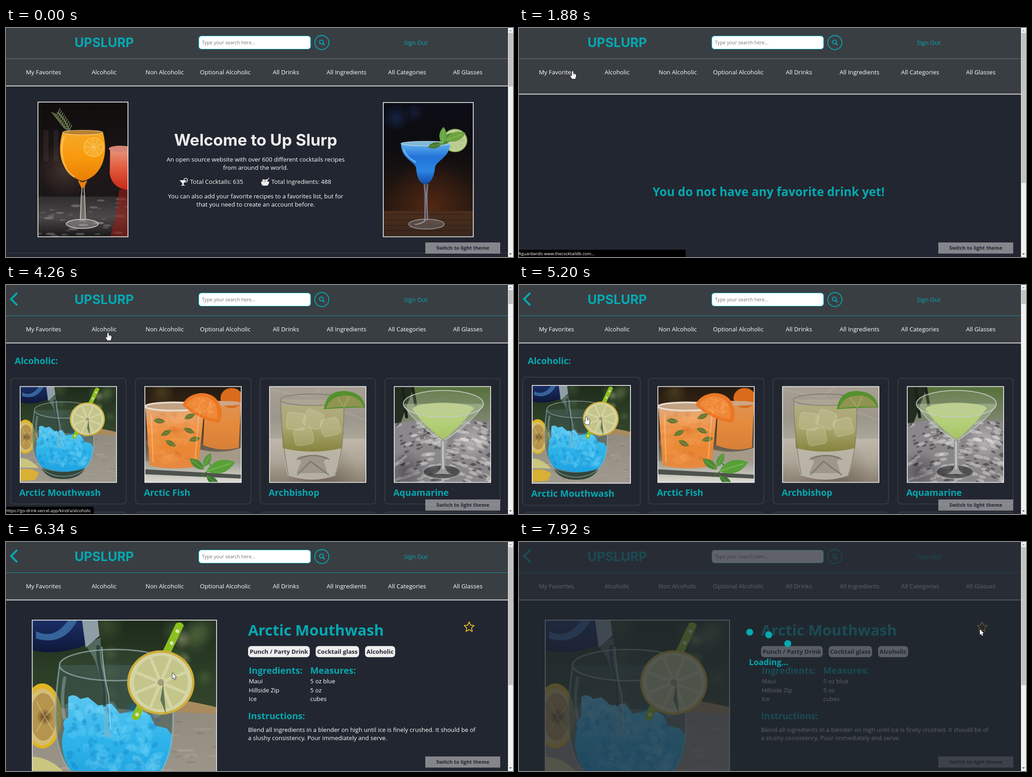
Animation, 1110 px wide and 504 px high, one loop 7.99 s. Source, as an HTML page with a canvas:

```html
<!DOCTYPE html>
<html lang="en">
<head>
<meta charset="utf-8">
<title>Cocktail site tour</title>
<style>
html, body { margin: 0; width: 100%; height: 100%; overflow: hidden; background: #222630; }
canvas { display: block; width: 1110px; height: 504px; }
</style>
</head>
<body>
<canvas id="stage" width="1110" height="504"></canvas>
<script>
const ctx = document.getElementById('stage').getContext('2d');
const LOOP = 7990, VIEW = 1099;
const BG = '#222630', BAR = '#393e43', TEAL = '#06a9b1', LIGHT = '#eeeeee', WHITE = '#ffffff';
const SANS = '"Open Sans", "Noto Sans", sans-serif';
const LOGO = 'Inter, sans-serif';

// ---- drawing helpers ----
function text(str, x, y, size = 13.1, color = WHITE, weight = 400, align = 'left', family = SANS) {
  ctx.font = `${weight} ${size}px ${family}`;
  ctx.textAlign = align;
  ctx.fillStyle = color;
  ctx.fillText(str, x, y);
}
const bold = (str, x, y, size, color = TEAL, align) => text(str, x, y, size, color, 700, align);

function rect(x, y, w, h, color) {
  ctx.fillStyle = color;
  ctx.fillRect(x, y, w, h);
}
function round(x, y, w, h, r, fill, stroke, width = 1) {
  ctx.beginPath();
  ctx.roundRect(x, y, w, h, r);
  if (fill) { ctx.fillStyle = fill; ctx.fill(); }
  if (stroke) { ctx.strokeStyle = stroke; ctx.lineWidth = width; ctx.stroke(); }
}
function oval(x, y, rx, ry, fill, stroke, width = 2, turn = 0) {
  ctx.beginPath();
  ctx.ellipse(x, y, rx, ry, turn, 0, Math.PI * 2);
  if (fill) { ctx.fillStyle = fill; ctx.fill(); }
  if (stroke) { ctx.strokeStyle = stroke; ctx.lineWidth = width; ctx.stroke(); }
}
function fill(d, color) {
  ctx.fillStyle = color;
  ctx.fill(new Path2D(d));
}
function line(d, color, width) {
  ctx.strokeStyle = color;
  ctx.lineWidth = width;
  ctx.stroke(new Path2D(d));
}
function fade(y0, y1, ...colors) {
  const g = ctx.createLinearGradient(0, y0, 0, y1);
  colors.forEach((c, i) => g.addColorStop(i / (colors.length - 1), c));
  return g;
}
function glow(x, y, r, rgb, alpha) {
  const g = ctx.createRadialGradient(x, y, 0, x, y, r);
  g.addColorStop(0, `rgba(${rgb},${alpha})`);
  g.addColorStop(1, `rgba(${rgb},0)`);
  rect(x - r, y - r, 2 * r, 2 * r, g);
}
function scatter(n, seed, draw) {
  const rnd = () => (seed = (seed * 16807) % 2147483647) / 2147483647;
  rnd();
  for (let i = 0; i < n; i++) draw(rnd(), rnd(), rnd());
}
function photo(x, y, w, h, unit, draw) {
  ctx.save();
  ctx.beginPath();
  ctx.rect(x, y, w, h);
  ctx.clip();
  ctx.translate(x, y);
  ctx.scale(w / unit, w / unit);
  draw();
  ctx.restore();
  ctx.strokeStyle = LIGHT;
  ctx.lineWidth = 1.7;
  ctx.strokeRect(x, y, w, h);
}
function slice(x, y, r, rim, pith, flesh, core, pieces = 9) {
  oval(x, y, r, r * .96, rim);
  oval(x, y, r * .93, r * .89, pith);
  for (let i = 0; i < pieces; i++) {
    const a = i / pieces * Math.PI * 2, half = Math.PI / pieces * .86;
    ctx.beginPath();
    ctx.moveTo(x + Math.cos(a) * r * .13, y + Math.sin(a) * r * .13);
    ctx.arc(x, y, r * .8, a - half, a + half);
    ctx.closePath();
    ctx.fillStyle = flesh;
    ctx.fill();
  }
  oval(x, y, r * .1, r * .1, core);
}
function leaf(x, y, len, turn, color) {
  ctx.save();
  ctx.translate(x, y);
  ctx.rotate(turn);
  fill(`M0 0 Q${len * .5} ${-len * .42} ${len} 0 Q${len * .5} ${len * .42} 0 0Z`, color);
  line(`M0 0 L${len * .85} 0`, 'rgba(190,220,140,.3)', len * .04);
  ctx.restore();
}

// ---- pictures ----
function orangeDrink() {
  rect(0, 0, 197, 298, fade(0, 298, '#100c0c', '#1e1819', '#171314'));
  for (let x = 12; x < 130; x += 22) rect(x, 62, 11, 68, 'rgba(105,85,85,.2)');
  glow(60, 150, 60, '150,110,90', .3);
  rect(0, 208, 197, 90, fade(208, 298, '#302d2e', '#4b4849', '#171617'));
  scatter(45, 7, (a, b, c) => oval(a * 197, 212 + b * 85, 2 + c * 10, 1 + c * 2, `rgba(205,200,198,${.08 + c * .25})`));
  fill('M158 104 L197 104 L197 194 Q163 190 157 158Z', fade(100, 194, '#e79b83', '#e2593c', '#c52716'));
  oval(180, 103, 25, 7, '#d58572');
  fill('M178 192 L197 194 L197 298 L158 298 L170 250Z', 'rgba(150,30,22,.6)');
  for (let i = 0; i < 9; i++) {
    const x = 68 - i * 3.2, y = 64 - i * 4.5;
    line(`M${x} ${y} l-13 ${-9 + i * .5} M${x} ${y} l6 -14`, '#63734d', 2);
  }
  line('M70 67 Q62 40 42 22', '#6e7c51', 2.5);
  fill('M54 66 C39 113 53 161 97 174 C143 163 155 112 142 66Z', fade(66, 175, '#f5a928', '#f89a0d', '#e87d06'));
  oval(98, 67, 44, 5, '#ba812f', '#f0cf8a', 1.2);
  line('M57 75 C43 122 62 155 80 165', 'rgba(255,231,160,.4)', 4);
  slice(122, 99, 25, '#f69800', '#f7bb4c', '#f8ab27', '#f5c66b');
  line('M90 173 Q99 184 95 205 L93 259 M105 173 Q99 184 102 205 L104 259', '#b8b0ab', 2);
  fill('M87 172 Q97 180 108 172 L101 189 L95 189Z', '#e4820c');
  fill('M94 205 L102 205 L104 263 L91 263Z', 'rgba(210,205,200,.32)');
  oval(97, 268, 35, 10, 'rgba(185,182,180,.4)', '#c0bbb7', 2);
}

function blueDrink() {
  rect(0, 0, 198, 297, fade(0, 297, '#0c0d16', '#0d0c10', '#211610', '#2d1c13'));
  glow(28, 34, 30, '30,54,105', .55);
  glow(68, 22, 22, '33,48,92', .45);
  glow(105, 230, 105, '105,47,20', .65);
  rect(0, 240, 198, 57, fade(240, 297, '#4b2e1d', '#39271d'));
  for (let y = 247; y < 297; y += 12) rect(0, y, 198, 1, 'rgba(17,10,8,.5)');
  slice(158, 84, 27, '#83a653', '#c6d39a', '#b7c98c', '#dbe3b4');
  fill('M39 91 C40 125 65 128 72 143 C74 171 83 180 93 181 C105 178 112 165 114 142 C120 127 146 121 147 91Z',
    fade(90, 181, '#61b2ed', '#2374d9', '#2b86e4', '#1349a9'));
  oval(93, 91, 54, 5, '#81b7d6', '#b0d4e7', 1.4);
  line('M45 104 Q51 121 72 132', 'rgba(185,225,255,.5)', 3);
  leaf(127, 94, 38, -.8, '#4d8434');
  leaf(130, 92, 38, -1.5, '#66a642');
  leaf(129, 91, 32, 2.9, '#47792f');
  leaf(136, 84, 48, -.35, '#6da340');
  line('M90 181 L93 205 L91 260 M98 181 L95 205 L98 260', '#8c92a2', 1.8);
  fill('M89 180 L99 180 L97 262 L91 262Z', 'rgba(132,146,182,.35)');
  oval(95, 269, 39, 11, 'rgba(130,126,133,.4)', '#8e8b8e', 2);
  line('M92 259 Q92 266 70 270', 'rgba(220,220,230,.6)', 2);
}

function mouthwash() {
  rect(0, 0, 400, 400, fade(0, 210, '#1d2a1b', '#2b3d26', '#34462c'));
  scatter(14, 31, (a, b, c) => glow(150 + a * 250, b * 170, 15 + c * 28, '100,125,75', .35));
  glow(325, 42, 22, '150,155,115', .6);
  glow(330, 84, 16, '140,150,105', .5);
  fill('M285 168 Q352 178 400 190 L400 215 L240 230Z', '#a88a5e');
  fill('M0 196 L120 190 L400 205 L400 400 L0 400Z', fade(200, 400, '#918b80', '#a09a8e'));
  scatter(70, 11, (a, b, c) => oval(a * 400, 220 + b * 180, 6 + c * 16, 2,
    c > .5 ? 'rgba(190,184,172,.25)' : 'rgba(80,74,66,.18)'));
  fill('M0 0 L130 0 L112 56 Q55 78 0 66Z', fade(0, 72, '#1a2e66', '#0e1738'));
  fill('M8 24 Q48 44 78 0 L98 0 Q68 58 8 40Z', '#35639a');
  fill('M108 0 L142 0 L146 34 L116 60Z', '#8f9ea6');
  oval(22, 209, 42, 71, '#e0b422');
  oval(22, 211, 35, 62, '#d3bd72');
  oval(24, 211, 28, 52, '#b5954d');
  glow(27, 211, 18, '80,52,30', .9);
  line('M27 211 L9 177 M27 211 L47 187 M27 211 L9 243 M27 211 L46 242', 'rgba(222,204,145,.5)', 2.5);
  fill('M0 298 Q43 300 77 340 L0 337Z', '#c9c680');
  fill('M0 348 Q42 335 78 360 L62 390 L0 394Z', '#d8b033');
  fill('M58 98 C48 180 39 272 81 327 C115 392 244 391 279 328 C319 269 302 165 298 98Z', 'rgba(62,88,84,.55)');
  fill('M78 168 Q90 158 104 172 L121 168 L143 186 L172 182 L190 204 L230 196 L256 207 L266 230 L292 236 L304 252 C304 288 290 327 263 346 Q176 368 94 338 C67 315 58 270 70 236 Q62 220 78 212Z',
    fade(160, 355, '#5cc8f0', '#2fb4ea', '#1fa2df'));
  scatter(130, 19, (a, b, c) => oval(80 + a * 195, 186 + b * 140, 4 + c * 11, 3 + c * 6,
    c > .45 ? 'rgba(130,218,250,.22)' : 'rgba(8,110,185,.24)', null, 1, a * 9));
  fill('M88 340 Q176 373 271 340 Q248 386 177 386 Q110 386 88 340Z', '#34463a');
  fill('M117 52 L148 38 C150 98 163 130 165 237 L177 256 L155 253 C157 151 147 95 120 62Z', 'rgba(150,180,186,.4)');
  line('M143 55 C139 99 157 118 157 188', 'rgba(28,45,42,.7)', 7);
  line('M151 58 Q155 119 166 165 L170 240', 'rgba(200,220,224,.6)', 2.5);
  oval(180, 98, 121, 34, 'rgba(148,176,166,.06)', 'rgba(150,172,172,.75)', 3);
  line('M59 102 C48 179 40 276 82 328 C117 391 242 390 279 329 C318 273 304 173 299 102', 'rgba(160,188,190,.55)', 3.5);
  line('M71 123 Q61 172 70 216', 'rgba(210,230,232,.3)', 7);
  fill('M312 7 Q324 1 329 12 L231 216 Q220 222 215 211Z', '#8cc01f');
  for (let i = 0; i < 8; i++) oval(315 - i * 12.5, 24 + i * 26, 4, 4, '#d9e6b4');
  slice(279, 136, 73, '#cfae3a', '#d4d4a4', '#c3c58b', '#a39c78', 8);
  fill('M284 138 L290 204 L278 174Z', '#607656');
}

function fishDrink() {
  rect(0, 0, 400, 400, fade(0, 400, '#241a10', '#3d2a18', '#6d6353', '#c3bfb3'));
  glow(70, 25, 55, '100,86,43', .5);
  fill('M250 55 L400 68 L390 254 Q320 275 242 245Z', fade(60, 255, '#dd9558', '#e58a3c', '#d98038'));
  oval(360, 48, 46, 42, '#d96c1c');
  oval(325, 70, 80, 10, '#cfa684');
  fill('M225 262 Q320 285 400 255 L400 320 L225 330Z', '#a59a88');
  rect(0, 312, 400, 88, fade(309, 400, '#9a9a90', '#dcdbd2'));
  fill('M0 345 L400 368 L400 384 L0 366Z', '#4d534c');
  fill('M2 82 L248 83 L222 332 Q115 352 20 330Z', fade(80, 345, '#e0ab80', '#ee9449', '#ea8733', '#e58a42'));
  scatter(30, 23, (a, b, c) => oval(30 + a * 180, 110 + b * 200, 10 + c * 22, 8 + c * 12,
    c > .5 ? 'rgba(250,180,110,.16)' : 'rgba(196,88,20,.14)'));
  oval(120, 83, 119, 17, '#c3a184', '#e6dccb', 7);
  fill('M157 78 C171 24 272 3 307 66 Q330 111 309 151 Q227 142 157 78Z', '#ea7724');
  fill('M171 76 C192 35 267 25 293 75 Q307 113 298 136 Q226 125 171 76Z', '#ef8838');
  scatter(40, 14, (a, b, c) => oval(203 + a * 85, 50 + b * 66, 4 + c * 7, 3, 'rgba(255,187,112,.25)', null, 1, a * 3));
  [[35, 141, .1], [163, 134, -.4], [160, 174, .4], [85, 225, .5], [181, 225, -.2], [111, 183, 2.7]]
    .forEach(([x, y, a]) => leaf(x, y, 50, a, '#6b7530'));
  line('M27 115 L34 316 M224 119 L208 312', 'rgba(255,225,181,.35)', 5);
  line('M228 377 L280 338 L253 300', '#417329', 4);
  leaf(247, 346, 76, -2.5, '#4d8a32');
  leaf(254, 353, 126, -.3, '#58a038');
  leaf(244, 336, 66, -1.1, '#57983a');
  leaf(255, 371, 70, .7, '#3e7830');
}

function archbishop() {
  rect(0, 0, 400, 400, fade(0, 400, '#a79f93', '#9d968b', '#b5afa3', '#8c8276'));
  line('M0 12 L165 45 L213 5 M240 80 L400 141', 'rgba(190,185,175,.3)', 5);
  rect(0, 218, 400, 182, fade(218, 400, '#bfb7a9', '#aea698', '#8a7f71'));
  glow(215, 365, 150, '65,56,42', .4);
  fill('M44 54 L310 54 C307 166 315 272 275 371 Q180 408 74 368 C47 278 53 154 44 54Z', 'rgba(180,176,156,.6)');
  fill('M48 80 L307 80 L300 257 Q174 287 55 257Z', fade(80, 275, '#b1ac80', '#a8a46c', '#85823c'));
  [[75, 105, .12], [160, 89, .4], [206, 144, -.25], [96, 181, -.2]].forEach(([x, y, a]) => {
    ctx.save();
    ctx.translate(x, y);
    ctx.rotate(a);
    round(0, 0, 78, 71, 16, 'rgba(214,213,182,.26)', 'rgba(228,228,204,.2)', 4);
    ctx.restore();
  });
  fill('M56 258 Q177 285 300 258 L274 370 Q174 406 74 370Z', 'rgba(190,185,172,.75)');
  fill('M113 296 Q175 276 244 296 L225 312 L240 361 L111 361 L132 312Z', '#9d978a');
  line('M113 305 Q183 270 248 305 M115 369 L170 312 L247 370', 'rgba(100,97,85,.6)', 5);
  oval(177, 55, 132, 24, 'rgba(160,155,135,.2)', 'rgba(110,108,92,.7)', 3);
  line('M46 60 Q50 230 78 367 M308 60 Q312 258 273 369', 'rgba(120,116,100,.7)', 3.5);
  fill('M225 95 Q236 13 317 19 Q389 25 397 87 Q306 88 225 95Z', '#55902f');
  fill('M234 91 Q254 35 324 37 Q370 42 391 84 Q302 81 234 91Z', '#8f9450');
  line('M309 87 L282 47 M309 87 L331 41', 'rgba(200,202,145,.5)', 3);
}

function aquamarine() {
  rect(0, 0, 400, 400, fade(0, 400, '#55703a', '#7b846c', '#8f8e90', '#6c6a6e'));
  fill('M0 0 L81 0 L26 154 L0 154Z', '#232c20');
  line('M34 0 L52 132 M76 0 L93 102', '#1b221a', 12);
  fill('M0 154 Q196 117 400 148 L400 400 L0 400Z', '#89878a');
  scatter(190, 52, (a, b, c) => oval(a * 400, 150 + b * 250, 5 + c * 16, 3 + c * 5,
    c > .5 ? 'rgba(228,225,222,.42)' : 'rgba(30,29,33,.42)', null, 1, -.5 + a));
  glow(320, 230, 80, '225,222,220', .5);
  glow(50, 355, 90, '35,33,38', .5);
  fill('M38 72 L370 72 Q325 143 204 228 Q84 146 38 72Z', 'rgba(170,186,150,.55)');
  fill('M74 92 Q196 61 329 89 Q287 155 204 221 Q118 158 74 92Z', fade(82, 221, '#b9cc8a', '#b4d078', '#a6c262'));
  oval(204, 72, 166, 56, 'rgba(200,212,185,.15)', 'rgba(200,206,200,.85)', 4);
  oval(204, 92, 126, 24, '#bccf90');
  line('M42 81 Q87 153 195 223 M366 82 Q321 150 211 223', 'rgba(208,214,204,.8)', 3.5);
  oval(197, 356, 77, 28, 'rgba(54,53,56,.7)', 'rgba(175,175,174,.8)', 3);
  fill('M193 222 L217 222 L211 334 Q216 359 237 365 L165 365 Q192 354 195 330Z', '#9a9d99');
  line('M202 228 L203 345', '#dcdcd6', 4);
}

const CARDS = [
  ['Arctic Mouthwash', mouthwash], ['Arctic Fish', fishDrink],
  ['Archbishop', archbishop], ['Aquamarine', aquamarine]
];
const NAV = ['My Favorites', 'Alcoholic', 'Non Alcoholic', 'Optional Alcoholic',
  'All Drinks', 'All Ingredients', 'All Categories', 'All Glasses'];

// ---- page parts ----
function header(height, back) {
  rect(0, 0, VIEW, height, BAR);
  rect(0, 67, VIEW, 1, back ? '#1b8f96' : '#777a7f');
  rect(0, height - .3, VIEW, 1.7, LIGHT);
  if (back) line('M24.5 17.5 L11 31 L24.5 44.5', TEAL, 4.2);
  text('UPSLURP', 215, 42.3, 28, TEAL, 700, 'center', LOGO);
  round(422, 17.5, 245, 29, 6, WHITE, TEAL, 1.2);
  text('Type your search here...', 429, 36, 10.5, '#757575');
  oval(691.5, 32, 15.5, 15.5, null, TEAL, 1.8);
  oval(690.5, 30.8, 4.2, 4.2, null, TEAL, 2);
  line('M693.8 34.2 L697.5 38', TEAL, 2.4);
  text('Sign Out', 871, 37, 13.1, TEAL);
  NAV.forEach((name, i) => text(name, 82 + i * 132.7, 102, 13.1, WHITE, 400, 'center'));
}

function home() {
  photo(70, 163, 197, 296.5, 197, orangeDrink);
  photo(826, 164, 197, 295.5, 198, blueDrink);
  text('Welcome to Up Slurp', 546.5, 259, 35, LIGHT, 700, 'center', LOGO);
  const mid = (s, y) => text(s, 546.5, y, 13.1, WHITE, 400, 'center');
  mid('An open source website with over 600 different cocktails recipes', 293.5);
  mid('from around the world.', 311.5);
  fill('M380 335 L395 335 L389 342 L389 345 L393 347 L382 347 L386 345 L386 342Z', LIGHT);
  oval(393.5, 335, 4, 4, null, LIGHT, 1.6);
  text('Total Cocktails: 635', 403, 343);
  fill('M558.5 338 L576 338 Q576 344 572 347 L562 347 Q558.5 344 558.5 338Z', LIGHT);
  oval(564, 335.5, 3, 2.5, LIGHT);
  oval(570, 335.5, 3, 2.5, LIGHT);
  line('M571 336 L576 330', LIGHT, 1.5);
  text('Total Ingredients: 488', 581, 343);
  mid('You can also add your favorite recipes to a favorites list, but for', 374.5);
  mid('that you need to create an account before.', 392.5);
  rect(0, 495, VIEW, 1, '#3c4048');
}

function favorites() {
  bold('You do not have any favorite drink yet!', 546.5, 352, 26.2, TEAL, 'center');
}

function list(scale) {
  bold('Alcoholic:', 19, 174, 19.66);
  CARDS.forEach(([name, draw], i) => {
    const x = 10.5 + i * 273;
    ctx.save();
    if (i === 0) {
      ctx.translate(137, 344);
      ctx.scale(scale, scale);
      ctx.translate(-137, -344);
    }
    round(x, 205.5, 252.5, 276.5, 7, BG, '#3b4047', 1.6);
    photo(x + 20.5, 223.5, 211, 211, 400, draw);
    bold(name, x + 18.5, 464, 19.66);
    ctx.restore();
    round(x, 500, 252.5, 276, 7, null, '#3b4047', 1.6);
  });
}

function star(x, y, r, color, width) {
  ctx.beginPath();
  for (let i = 0; i < 10; i++) {
    const a = i * Math.PI / 5 - Math.PI / 2, d = i % 2 ? r * .48 : r;
    ctx.lineTo(x + Math.cos(a) * d, y + Math.sin(a) * d);
  }
  ctx.closePath();
  ctx.lineJoin = 'round';
  ctx.strokeStyle = color;
  ctx.lineWidth = width;
  ctx.stroke();
  ctx.lineJoin = 'miter';
}

function detail(hover) {
  photo(57.5, 172, 403.5, 403.5, 400, mouthwash);
  bold('Arctic Mouthwash', 530, 206, 32.77);
  [['Punch / Party Drink', 530, 135], ['Cocktail glass', 678, 95], ['Alcoholic', 786, 66]].forEach(([s, x, w]) => {
    round(x, 229, w, 24.5, 7, LIGHT);
    bold(s, x + w / 2, 246, 13.1, BG, 'center');
  });
  bold('Ingredients:', 531.5, 290, 19.66);
  bold('Measures:', 666, 290, 19.66);
  [['Maui', '5 oz blue'], ['Hillside Zip', '5 oz'], ['Ice', 'cubes']].forEach(([a, b], i) => {
    text(a, 531.5, 311 + i * 19.6);
    text(b, 666, 311 + i * 19.6);
  });
  bold('Instructions:', 530, 390, 19.66);
  text('Blend all ingredients in a blender on high until ice is finely crushed. It should be of', 530, 418);
  text('a slushy consistency. Pour immediately and serve.', 530, 436);
  if (hover) star(1014, 187, 12, '#e9e51c', 3);
  else star(1014, 187.5, 11.5, '#f5be29', 1.8);
}

function themeButton() {
  rect(918, 472, 164, 24.5, 'rgba(238,238,238,.48)');
  bold('Switch to light theme', 1000, 488.3, 10.9, BG, 'center');
}

function scrollbar(end) {
  rect(VIEW, 0, 11, 504, '#f1f1f1');
  rect(1100, 11, 9.5, end - 11, '#c1c1c1');
  fill('M1101.5 7 L1104.5 4 L1107.5 7Z', '#9a9a9a');
  fill('M1101.5 496 L1104.5 499 L1107.5 496Z', '#505050');
}

function status(str, width, alpha) {
  ctx.globalAlpha = alpha;
  round(-4, 488, width + 4, 20, 3, '#000000');
  text(str, -1, 499.7, 9.3);
  ctx.globalAlpha = 1;
}

function spinner(t, alpha) {
  ctx.globalAlpha = alpha;
  [0, 100, 230].forEach((delay, i) => {
    const p = Math.max(0, (t - 7520 - delay) / 400);
    oval(505 + i * 41.7, 198.5 + 20.5 * (1 + Math.cos(Math.PI * p)), 7.6, 7.6, TEAL);
  });
  bold('Loading...', 503.5, 270.5, 18, TEAL);
  ctx.globalAlpha = 1;
}

function pointer(x, y, hand) {
  const shape = hand
    ? 'M0 1 Q1 -1.3 2.5 1 L3 6 L6 6 L8.7 7.2 L8.8 12 L7 17 L.3 17 L-3.6 11.2 Q-4.2 8.8 -2 9.7 L-.4 11.2Z'
    : 'M0 0 L0 12.5 L2.8 10 L4.8 14.5 L7 13.5 L5 9.2 L8.8 9Z';
  ctx.save();
  ctx.translate(x, y);
  ctx.lineJoin = 'round';
  line(shape, '#15171b', 1.6);
  fill(shape, WHITE);
  if (hand) line('M3.2 9.5 V6.4 M5.8 10 V7', '#55585c', .6);
  ctx.restore();
}

// ---- timing ----
// Progress in n equal jumps, the first at t0 and the last at t1.
function steps(t, t0, t1, n) {
  if (t < t0) return 0;
  return Math.min(1, (Math.floor((t - t0) / (t1 - t0) * (n - 1) + .01) + 1) / n);
}
const within = (t, a, b) => t >= a && t < b;
const ease = p => p * p * (3 - 2 * p);

// start, end, jumps, x, y, dip
const MOVES = [
  [260, 1010, 12, 104, 88, 0], [1080, 1480, 6, 116, 95, 0], [2940, 3510, 9, 222, 105, 0],
  [4650, 4920, 5, 146, 290, 0], [6070, 6830, 12, 988, 199, 30], [6900, 7100, 4, 1009, 192, 0]
];
function cursorAt(t) {
  let x = 922, y = 510;
  for (const [t0, t1, n, tx, ty, dip] of MOVES) {
    const p = ease(steps(t, t0, t1, n));
    x += (tx - x) * p;
    y += (ty - y) * p + dip * Math.sin(Math.PI * p);
  }
  return [x, y];
}

function render(t) {
  const page = t < 1880 ? 0 : t < 4190 ? 1 : t < 5740 ? 2 : 3;
  const tall = within(t, 1880, 1950) || within(t, 4190, 4260) || within(t, 5740, 5810);
  const [cx, cy] = cursorAt(t);

  rect(0, 0, 1110, 504, BG);
  ctx.save();
  if (tall) ctx.translate(0, 18);
  if (page === 0) home();
  else if (page === 1) favorites();
  else if (page === 2) {
    const press = within(t, 5130, 5200) ? .012 : 0;
    list(1 + .02 * steps(t, 4780, 4920, 3) - press);
  } else detail(within(t, 6970, 7520));
  ctx.restore();

  header(tall ? 145 : 127, page > 1);
  ctx.strokeStyle = LIGHT;
  ctx.lineWidth = 1;
  if (within(t, 940, 1880)) ctx.strokeRect(36.5, 81.5, 91, 32);
  if (within(t, 3240, 4190)) ctx.strokeRect(180.5, 81.5, 69, 32);
  themeButton();

  const dim = steps(t, 7520, 7650, 3);
  if (dim) {
    rect(0, 0, VIEW, 504, `rgba(34,39,48,${.72 * dim})`);
    spinner(t, dim);
  }
  scrollbar([129, tall ? 341 : 349, 42, tall ? 309 : 315][page]);

  if (within(t, 1080, 1410)) status('https://go-drink.vercel.app/favorites', 166, 1);
  if (within(t, 1410, 2340)) status('Aguardando www.thecocktaildb.com...', 365, 1 - steps(t, 2210, 2340, 3));
  if (within(t, 3300, 4450)) status('https://go-drink.vercel.app/kind/a/alcoholic', 192, 1 - steps(t, 4330, 4450, 3));

  if ([1410, 3440, 5130, 7450].some(c => within(t, c, c + 70)))
    oval(cx - 1, cy - 1, 10, 10, 'rgba(235,210,15,.65)');
  const hand = within(t, 940, 3010) || within(t, 3240, 4710) || within(t, 4780, 6070) || within(t, 6970, 7520);
  if (t >= 260) pointer(cx, cy, hand);
}

function tick() {
  render(performance.now() % LOOP);
  requestAnimationFrame(tick);
}
tick();
</script>
</body>
</html>
```
